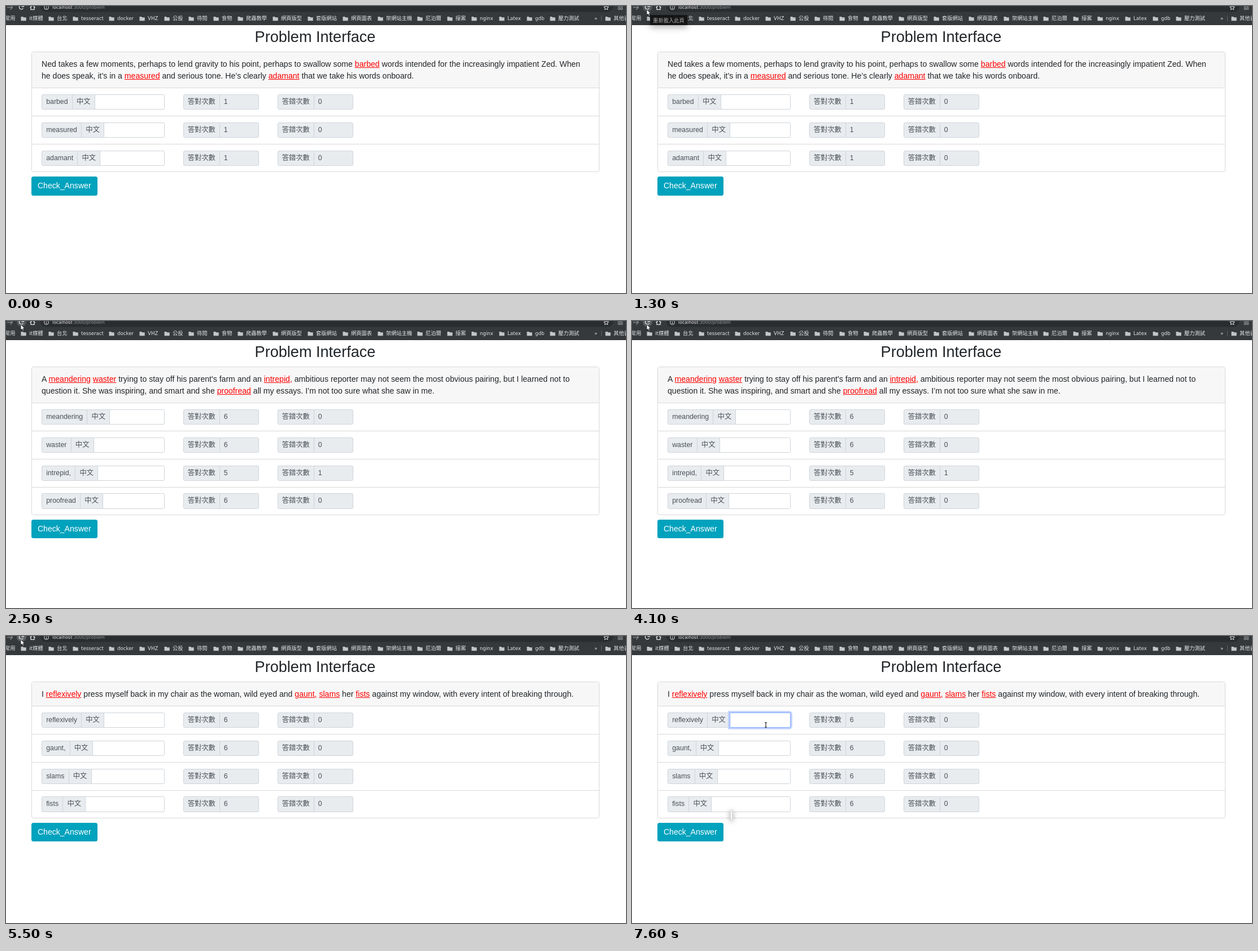
Recreate the animation shown at these times as an HTML page. Size 1098x510 px, loop 8000 ms.

```html
<!DOCTYPE html>
<html lang="zh-TW">
<head>
<meta charset="utf-8">
<style>
html, body { margin: 0; width: 100%; height: 100%; overflow: hidden; background: #fff; }
body { position: relative; color: #212529; font: 14.08px/21.12px "Liberation Sans", Arial, "Noto Sans CJK TC", "Noto Sans CJK", sans-serif; white-space: nowrap; }
div, svg { box-sizing: border-box; }
#bar, #bar span, #page > *, #tip, #ghost, svg.over { position: absolute; }
#bar { left: 0; top: 0; width: 1098px; height: 34px; background: #35393c; overflow: hidden; }
#bar svg { position: absolute; left: 0; top: 0; }
#bar span { color: #e4e6e8; line-height: 14px; font-family: "DejaVu Sans", "Noto Sans CJK TC", "Noto Sans CJK", sans-serif; }
#bar i { font-style: normal; color: #92969a; }
h2 { margin: 0; left: 44px; top: 37.5px; width: 1007px; text-align: center; font-size: 27.1px; line-height: 34px; font-weight: 400; }
.card { left: 44.6px; top: 81px; width: 1006.3px; border: 1px solid #d9d9d9; border-radius: 3.5px; overflow: hidden; }
.head { background: #f7f7f7; padding: 10.5px 0 0 17.4px; }
.head u { color: #f00; }
.line { left: 45px; width: 1005px; height: 1px; background: #d9d9d9; }
.group { display: flex; height: 27.3px; font-size: 12.32px; line-height: 25px; color: #495057; }
.group div { border: 1px solid #ced4da; background: #e9ecef; padding: 0 6.9px; margin-left: -1px; }
.group div:first-child { margin-left: 0; border-radius: 2.8px 0 0 2.8px; }
.group div:last-child { flex: 1; border-radius: 0 2.8px 2.8px 0; position: relative; }
.group .word { padding: 0 7.2px; }
.group .input { background: #fff; }
.group .focus { border-color: #80acff; box-shadow: 0 0 0 2.8px #bfd0ff; }
.focus.caret::after { content: ""; position: absolute; left: 6.6px; top: 5px; width: 1px; height: 14px; background: #333; }
.button { left: 44.6px; width: 117.3px; height: 33.5px; border-radius: 3.5px; background: #00a2bd; color: #fff; text-align: center; line-height: 33.5px; }
#tip { left: 32px; top: 16px; width: 66px; height: 18px; background: #151515; color: #aaa; font: 9.3px/18px "Noto Sans CJK TC", "Noto Sans CJK", sans-serif; text-align: center; box-shadow: 0 4px 12px rgba(0,0,0,.3); }
#ghost { left: 174px; top: 309px; width: 4px; height: 18px; background: #fff; border: 1px solid #d4d4d4; box-shadow: 0 2px 10px rgba(0,0,0,.5); }
svg.over { left: 0; top: 0; pointer-events: none; }
</style>
</head>
<body>
<div id="page"></div>
<div id="bar">
  <svg id="icons" width="1098" height="34" fill="none" stroke="#e4e6e8" stroke-width="1.3">
    <rect x="60" y="-12" width="1016" height="22.5" rx="11" fill="#2a2d30" stroke="none"/>
    <g fill="#fff" stroke="none"><circle id="hot" cx="27.5" cy="1.8" r="8.5"/><circle id="home" cx="47" cy="1.8" r="8.5"/></g>
    <path d="M2 2.5H11M7.5-1.5L11.5 2.5L7.5 6.5" stroke="#85898c"/>
    <path d="M30.4 4.2A3.8 3.8 0 1 1 30-.6M31.2-3V1.2H27.5"/>
    <path d="M42.5 2.8L47-1.4L51.5 2.8M44 2V6.4H50V2"/>
    <path d="M71.5 2.2V5M71.5 0V1" stroke-width="1"/><circle cx="71.5" cy="2.5" r="3.9" stroke-width="1"/>
    <path d="M1063-1.5L1064.2 1.5L1067.3 1.7L1064.9 3.6L1065.8 6.6L1063 5L1060.2 6.6L1061.1 3.6L1058.7 1.7L1061.8 1.5Z" stroke-width="1"/>
    <g stroke="#b4b7ba" stroke-width=".9"><path d="M1083.5 1.6H1092.5M1087 5H1089"/><circle cx="1085.6" cy="5" r="1.6"/><circle cx="1090.4" cy="5" r="1.6"/></g>
    <path d="M1054.5 17V27" stroke="#5d6164" stroke-width="1"/>
  </svg>
  <span style="left:82px;top:-4.5px;font-size:7.85px">localhost<i>:3000/problem</i></span>
</div>
<div id="ghost"></div>
<div id="tip">重新載入此頁</div>
<svg class="over" width="1098" height="510">
  <path id="arrow" d="M0 0V10L2.3 8L4 11.5L5.6 10.8L4.1 7.4H7.2Z" fill="#fff" stroke="#111" stroke-width=".8"/>
  <path id="beam" d="M-2-4.5Q0-4.5 0-3.5Q0-4.5 2-4.5M0-3.5V3.5M-2 4.5Q0 4.5 0 3.5Q0 4.5 2 4.5" fill="none" stroke="#222" stroke-width="1.2"/>
</svg>
<script>
const $ = id => document.getElementById(id);

const bookmarks = [["常用", -2], ["it媒體", 41], ["台北", 90], ["tesseract", 133], ["docker", 197], ["VHZ", 251],
  ["公投", 295], ["待閱", 338], ["食物", 382], ["爬蟲教學", 425], ["網頁版型", 487], ["套版網站", 549],
  ["網頁圖表", 611], ["架網站主機", 673], ["尼泊爾", 743], ["接案", 796], ["nginx", 839], ["Latex", 888],
  ["gdb", 937], ["壓力測試", 978], ["其他書籤", 1076]];
const label = (text, x) => {
  const size = /^[\x00-\xff]+$/.test(text) ? 8.65 : 9.25;
  $("bar").insertAdjacentHTML("beforeend", `<span style="left:${x}px;top:15px;font-size:${size}px">${text}</span>`);
};
let folders = "";
for (const [text, x] of bookmarks) {
  label(text, x);
  folders += `M${x - 14.5} 19h3.6l1 1.2h4.6v6h-9.2z`;
}
label("»", 1042);
$("icons").insertAdjacentHTML("beforeend", `<path d="${folders}" fill="#c3c6c9" stroke="none"/>`);

// Underscored words become the quizzed words; scores are [right, wrong].
const problems = [
  { lines: ["Ned takes a few moments, perhaps to lend gravity to his point, perhaps to swallow some _barbed_ words intended for the increasingly impatient Zed. When",
    "he does speak, it’s in a _measured_ and serious tone. He’s clearly _adamant_ that we take his words onboard."],
    scores: [[1, 0], [1, 0], [1, 0]] },
  { lines: ["Benlio _vaguely_ resembles his _namesake,_ dark skinned, tall and noticeably well built, though it’s clear he couldn’t be less of a fighter. This Benlio Durno is all",
    "smiles and seems to have a _penchant_ for laughing at his own jokes."],
    scores: [[4, 0], [4, 0], [4, 0]] },
  { lines: ["A _meandering_ _waster_ trying to stay off his parent's farm and an _intrepid,_ ambitious reporter may not seem the most obvious pairing, but I learned not to",
    "question it. She was inspiring, and smart and she _proofread_ all my essays. I’m not too sure what she saw in me."],
    scores: [[6, 0], [6, 0], [5, 1], [6, 0]] },
  { lines: ["I _reflexively_ press myself back in my chair as the woman, wild eyed and _gaunt,_ _slams_ her _fists_ against my window, with every intent of breaking through."],
    scores: [[6, 0], [6, 0], [6, 0], [6, 0]] }
];

const group = (x, y, width, cells) =>
  `<div class="group" style="left:${x}px;top:${y}px;width:${width}px">${cells}</div>`;
const cell = (text, cls = "") => `<div class="${cls}">${text}</div>`;

function render({ lines, scores }) {
  const text = lines.join("<br>");
  const words = [...text.matchAll(/_(.+?)_/g)].map(m => m[1]);
  const head = lines.length > 1 ? 146 : 125, pitch = 49.8;
  const bottom = head + pitch * words.length;
  let html = `<h2>Problem Interface</h2>
    <div class="card" style="height:${bottom - 81}px"><div class="head" style="height:${head - 82}px">${text.replace(/_(.+?)_/g, "<u>$1</u>")}</div></div>`;
  words.forEach((word, i) => {
    const top = head + pitch * i, y = top + 11;
    html += `<div class="line" style="top:${top - .8}px"></div>`
      + group(63, y, 217.8, cell(word, "word") + cell("中文", "word") + cell("", "input"))
      + group(313.8, y, 134, cell("答對次數") + cell(scores[i][0]))
      + group(480.8, y, 134, cell("答錯次數") + cell(scores[i][1]));
  });
  $("page").innerHTML = html + `<div class="button" style="top:${bottom + 7.7}px">Check_Answer</div>`;
}

// Linear interpolation through [time, ...values] keys.
function track(keys, t) {
  const i = keys.findIndex(k => k[0] > t);
  if (i < 0) return keys[keys.length - 1].slice(1);
  if (i === 0) return keys[0].slice(1);
  const [a, b] = [keys[i - 1], keys[i]], f = (t - a[0]) / (b[0] - a[0]);
  return a.slice(1).map((v, j) => v + (b[j + 1] - v) * f);
}
const pointer = [[200, 44, 10], [300, 45, 8], [400, 45, 8], [500, 46, 9], [600, 38, 8], [700, 30, 7], [800, 26, 6],
  [6300, 26, 6], [6400, 29, 12], [6600, 85, 62], [6800, 185, 132], [7000, 237, 158]];
const tipFade = [[900, 0], [1000, .35], [1100, .75], [1200, 1], [1300, 1], [1600, 0]];
const glow = [[600, 0], [700, .1], [800, .16], [2200, .16], [2300, .24], [2500, .16], [4000, .16], [4200, .22], [4500, .16],
  [5200, .16], [5300, .24], [5900, .16], [6300, .16], [6500, 0]];

let shown = -1;
function frame(now) {
  const t = Math.floor(now % 8000 / 100) * 100;
  const index = t < 1500 ? 0 : t < 2500 ? 1 : t < 5500 ? 2 : 3;
  if (index !== shown) render(problems[shown = index]);

  const [x, y] = track(pointer, t);
  const beam = t >= 6800;
  for (const id of ["arrow", "beam"]) $(id).setAttribute("transform", `translate(${x} ${y})`);
  $("arrow").style.opacity = +(t >= 200 && !beam);
  $("beam").style.opacity = +beam;
  $("tip").style.opacity = track(tipFade, t)[0];
  $("hot").style.opacity = track(glow, t)[0];
  $("home").style.opacity = t === 500 ? .1 : 0;

  const focused = t >= 7100;
  $("ghost").style.opacity = +focused;
  const input = document.querySelector(".input");
  input.classList.toggle("focus", focused);
  input.classList.toggle("caret", focused && t < 7600);
}
const start = performance.now();
function loop(now) {
  frame(Math.max(0, now - start));
  requestAnimationFrame(loop);
}
requestAnimationFrame(loop);
</script>
</body>
</html>
```
